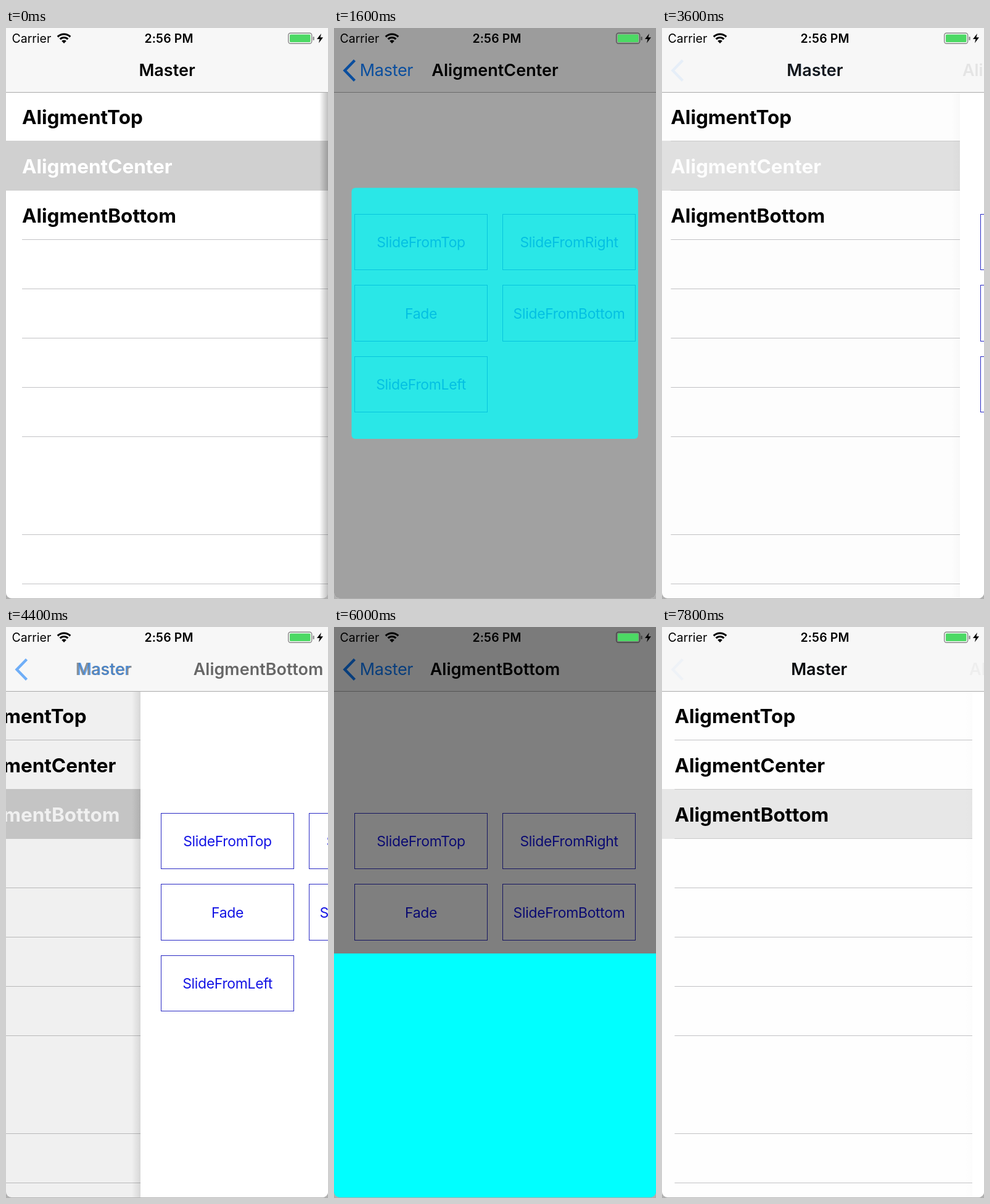
Write an HTML page with a canvas that moves like this. It is 522 px wide and 927 px high and loops after 8000 ms.

```html
<!DOCTYPE html>
<html lang="en">
<head>
<meta charset="utf-8">
<title>Popup alignment demo</title>
<style>
html, body { margin: 0; width: 100%; height: 100%; overflow: hidden; background: #b0b0b0; }
canvas { display: block; }
</style>
</head>
<body>
<canvas id="stage" width="522" height="927"></canvas>
<script>
const W = 522, H = 927, NAV = 104, LOOP = 8000, STEP = 200;
const ctx = document.getElementById('stage').getContext('2d');
const BLUE = '#107cf9', INK = '#1414e4';
const BATTERY_EDGE = 'rgba(0,0,0,0.45)';
const ROWS = ['AligmentTop', 'AligmentCenter', 'AligmentBottom'];
const LINES = [183, 263, 343, 423, 503, 583, 663, 822, 902];
const BUTTONS = [
  ['SlideFromTop', 33, 302], ['SlideFromRight', 273, 302],
  ['Fade', 33, 417.5], ['SlideFromBottom', 273, 417.5],
  ['SlideFromLeft', 33, 533]
];
// One visit to a detail screen per entry, times in ms
const VISITS = [
  { row: 1, touch: 0, push: 0, show: 1400, hide: 2650, pop: 3296, end: 4150 },
  { row: 2, touch: 4150, push: 4260, show: 5680, hide: 6750, pop: 7432, end: LOOP }
];

const clamp = v => Math.max(0, Math.min(1, v));
const smooth = v => { v = clamp(v); return v * v * (3 - 2 * v); };
const spring = ms => { const x = Math.max(0, ms) * 0.014; return 1 - (1 + x) * Math.exp(-x); };

function rect(x, y, w, h, fill) {
  ctx.fillStyle = fill;
  ctx.fillRect(x, y, w, h);
}

function text(str, x, y, font, fill, align = 'left', spacing = 0) {
  ctx.font = font + ' Inter, sans-serif';
  ctx.letterSpacing = spacing + 'px';
  ctx.textAlign = align;
  ctx.fillStyle = fill;
  ctx.fillText(str, x, y);
}

function withAlpha(alpha, draw) {
  if (alpha <= 0) return;
  ctx.save();
  ctx.globalAlpha *= alpha;
  draw();
  ctx.restore();
}

function roundRect(x, y, w, h, r) {
  ctx.beginPath();
  ctx.roundRect(x, y, w, h, r);
}

function drawList(cover, row, highlight) {
  const dx = -0.3 * W * cover;
  rect(0, NAV, W, H, '#fff');
  LINES.forEach((y, i) => {
    const besideRow = i === row || i === row - 1;
    if (highlight < 1 || !besideRow) rect(26 + dx, y, W, 1, '#c3c3c5');
  });
  withAlpha(highlight, () => rect(0, 183 + 80 * (row - 1), W, 81, '#d0d0d0'));
  ROWS.forEach((label, i) => {
    const lit = i === row && highlight > 0.55;
    text(label, 26 + dx, 156 + 80 * i, '700 31.5px', lit ? '#fff' : '#000');
  });
  withAlpha(0.1 * cover, () => rect(0, NAV, W, H, '#000'));
}

function drawDetail(cover, shadow) {
  const left = Math.round(W * (1 - cover));
  ctx.save();
  ctx.translate(left, 0);
  const shade = ctx.createLinearGradient(-14, 0, 0, 0);
  shade.addColorStop(0, 'rgba(0,0,0,0)');
  shade.addColorStop(1, `rgba(0,0,0,${0.25 * shadow})`);
  rect(-14, NAV, 14, H, shade);
  rect(0, NAV, W, H, '#fff');
  ctx.strokeStyle = '#2a2ac4';
  ctx.lineWidth = 1;
  for (const [label, x, y] of BUTTONS) {
    const top = Math.floor(y), bottom = Math.ceil(y + 90);
    ctx.strokeRect(x + 0.5, top + 0.5, 215, bottom - top);
    text(label, x + 108, Math.ceil(y) + 54, '400 23px', INK, 'center', -0.35);
  }
  ctx.restore();
}

function drawNavBar(cover, title) {
  rect(0, 0, W, NAV, '#f7f7f7');
  rect(0, NAV, W, 1, '#a9a9a9');
  const masterX = 261 - 176 * cover;
  withAlpha(1 - cover, () => text('Master', masterX, 78, '600 27px', '#000', 'center'));
  withAlpha(cover, () => {
    text('Master', masterX, 78, '400 27px', BLUE, 'center', -0.3);
    ctx.strokeStyle = BLUE;
    ctx.lineWidth = 4.4;
    ctx.beginPath();
    ctx.moveTo(33.5, 52.5);
    ctx.lineTo(17.5, 69);
    ctx.lineTo(33.5, 85.5);
    ctx.stroke();
    text(title, 261 + 355 * (1 - cover), 78, '600 27px', '#000', 'center');
  });
}

function drawPopup(visit, amount) {
  if (amount <= 0) return;
  withAlpha(0.5 * amount, () => rect(0, 0, W, H, '#000'));
  if (visit.row === 1) {
    withAlpha(amount, () => {
      roundRect(28.5, 259.5, 464.5, 407.5, 6);
      ctx.fillStyle = '#0ff';
      ctx.fill();
    });
  } else {
    rect(0, Math.round(H - 397 * amount), W, 397, '#0ff');
  }
}

function drawStatusBar() {
  text('Carrier', 9.5, 24, '400 19.5px', '#000');
  text('2:56 PM', 264, 24, '600 19.5px', '#000', 'center', 0.1);

  ctx.strokeStyle = '#000';
  ctx.lineWidth = 3.2;
  for (const radius of [14.5, 9]) {
    ctx.beginPath();
    ctx.arc(94, 24.5, radius, -Math.PI * 0.75, -Math.PI * 0.25);
    ctx.stroke();
  }
  ctx.fillStyle = '#000';
  ctx.beginPath();
  ctx.moveTo(94, 25);
  ctx.arc(94, 25, 5.5, -Math.PI * 0.75, -Math.PI * 0.25);
  ctx.fill();

  ctx.strokeStyle = BATTERY_EDGE;
  ctx.lineWidth = 1.4;
  roundRect(457.7, 8.2, 38, 17, 3.5);
  ctx.stroke();
  ctx.fillStyle = '#4cd964';
  roundRect(460, 10.5, 33.5, 12.5, 1.5);
  ctx.fill();
  ctx.fillStyle = BATTERY_EDGE;
  roundRect(497.5, 14, 2.2, 6, 1);
  ctx.fill();

  ctx.fillStyle = '#000';
  ctx.beginPath();
  [[511, 9], [504, 18], [508.5, 18], [507, 24.5], [514, 15.3], [509.5, 15.3]]
    .forEach(([x, y]) => ctx.lineTo(x, y));
  ctx.fill();
}

function render(t) {
  const visit = VISITS.find(v => t < v.end);
  const popping = t >= visit.pop;
  const cover = popping ? 1 - spring(t - visit.pop) : spring(t - visit.push);
  const highlight = t < visit.touch ? 0 : 1 - smooth((t - visit.pop) / 730);
  const popup = smooth((t - visit.show) / 300) - smooth((t - visit.hide) / 300);

  rect(0, 0, W, H, '#b0b0b0');
  ctx.save();
  roundRect(0, 0, W, H - 1, [0, 0, 9, 9]);
  ctx.clip();
  drawList(cover, visit.row, highlight);
  drawDetail(cover, popping ? cover : 1 - cover);
  drawNavBar(cover, ROWS[visit.row]);
  drawPopup(visit, popup);
  drawStatusBar();
  ctx.restore();
}

const start = performance.now();
function frame() {
  const t = (performance.now() - start) % LOOP;
  render(Math.floor(t / STEP) * STEP);
  requestAnimationFrame(frame);
}
frame();
</script>
</body>
</html>
```
